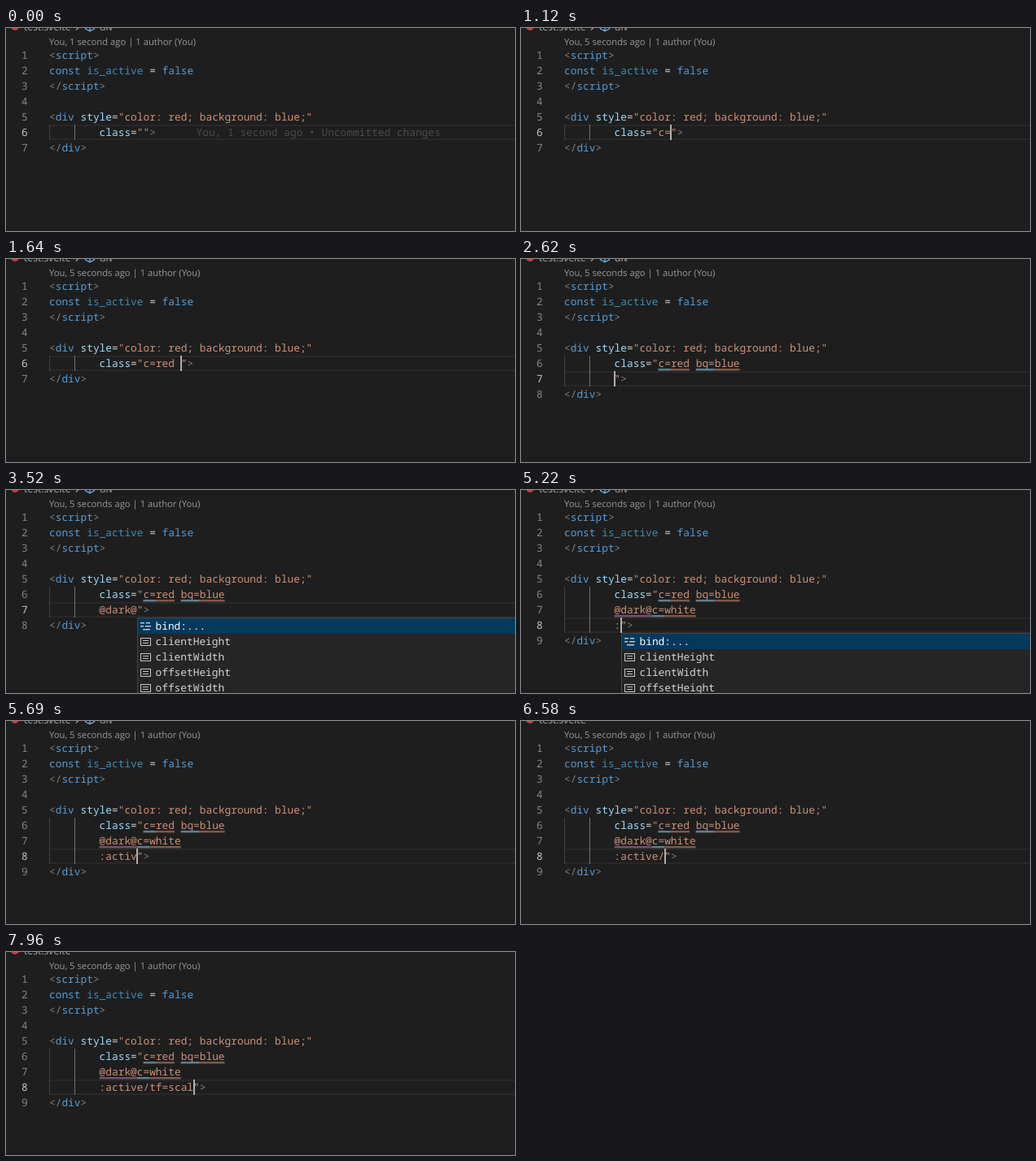
Write an HTML page with a canvas that moves like this. It is 625 by 250 pixels and loops after 8000 ms.

```html
<!DOCTYPE html>
<html lang="en">
<head>
<meta charset="utf-8">
<title>Editor typing</title>
<style>
html, body { margin: 0; width: 100%; height: 100%; overflow: hidden; background: #1e1e1e; }
canvas { display: block; width: 625px; height: 250px; }
</style>
</head>
<body>
<canvas id="stage" width="625" height="250"></canvas>
<script>
const ctx = document.getElementById('stage').getContext('2d');
const LOOP = 8000, LEFT = 53, CHAR = 7.7, ROW = 19, FIRST = 24;
const MONO = '12.83px "Noto Sans Mono", "DejaVu Sans Mono", monospace';
const LENS = '11.25px "Open Sans", "Noto Sans", sans-serif';
const CRUMB = '12.2px "Open Sans", "Noto Sans", sans-serif';
const C = {
  bg: '#1e1e1e', tag: '#808080', key: '#569cd6', attr: '#9cdcfe',
  str: '#ce9178', plain: '#d4d4d4', unused: '#3f8bb4'
};

// Typing bursts: start, interval, characters
const bursts = [
  [960, 160, 'c='], [1300, 90, 'red '], [1840, 78.5, 'bg=blue\n'],
  [2720, 85, '@dark@'], [3750, 95, 'c='], [3960, 75, 'white'], [4530, 0, '\n'],
  [5220, 0, ':'], [5420, 67.5, 'active'], [5920, 0, '/'],
  [6870, 130, 'tf'], [7430, 0, '='], [7660, 100, 'scal']
];
const keys = bursts.flatMap(([start, step, s]) => [...s].map((ch, i) => [start + i * step, ch]));

const popups = [[1220, 1300], [3225, 3750], [3890, 3960], [5220, 5420], [6150, 6380]];
const caretOff = [[0, 260], [3520, 3750], [4400, 4530], [5020, 5220]];

// Underlines: time, line of the value, column, length, colour
const BLUE = '#5b7f90', BROWN = '#7e5947', PLUM = '#74506f';
const marks = [
  [1670, 0, 15, 2, BLUE], [1670, 0, 17, 3, BROWN],
  [2386, 0, 21, 3, BLUE], [2386, 0, 24, 4, BROWN],
  [4330, 1, 8, 6, PLUM], [4330, 1, 14, 2, BLUE], [4330, 1, 16, 5, BROWN]
];
const options = ['bind:...', 'clientHeight', 'clientWidth', 'offsetHeight', 'offsetWidth'];

const within = (list, t) => list.some(([a, b]) => t >= a && t < b);
const colX = col => LEFT + col * CHAR;
const rowY = n => FIRST + (n - 1) * ROW;

function box(x, y, w, h, color) {
  ctx.fillStyle = color;
  ctx.fillRect(x, y, w, h);
}

function text(s, x, y, color, font = MONO) {
  ctx.font = font;
  ctx.fillStyle = color;
  ctx.fillText(s, x, y);
}

function path(points, color) {
  ctx.strokeStyle = color;
  ctx.lineWidth = 1.2;
  ctx.beginPath();
  points.forEach(([x, y]) => ctx.lineTo(x, y));
  ctx.stroke();
}

function code(n, parts, col = 0) {
  for (const [s, color] of parts) {
    text(s, colX(col), rowY(n) + 14, color);
    col += s.length;
  }
}

function breadcrumb(t) {
  ctx.fillStyle = '#cc3e44';
  ctx.beginPath();
  ctx.arc(11, -2, 5, 0, Math.PI * 2);
  ctx.fill();
  text('test.svelte', 22, 3, '#a9a9a9', CRUMB);
  if (t >= 6580) return;
  path([[86, 2.5], [90, -1.5]], '#a9a9a9');
  path([[97.5, -3], [97.5, 1], [103, 3.8], [108.5, 1], [108.5, -3]], '#75beff');
  path([[103, 3.8], [103, -1]], '#75beff');
  text('div', 115, 3, '#a9a9a9', CRUMB);
}

function optionIcon(x, y, isFirst) {
  if (isFirst) {
    [[0, 0, 5], [7, 0, 5], [0, 4, 4], [6, 4, 7], [3, 8, 9]]
      .forEach(([dx, dy, w]) => box(x + dx, y + dy, w, 1.5, '#c5c5c5'));
    return;
  }
  ctx.strokeStyle = '#c5c5c5';
  ctx.lineWidth = 1;
  ctx.strokeRect(x + .5, y + .5, 12, 9);
  box(x + 3, y + 3, 7, 1, '#c5c5c5');
  box(x + 3, y + 6, 7, 1, '#c5c5c5');
}

function popup(x, y) {
  box(x, y, 640, 120, '#454545');
  box(x + 1, y + 1, 640, 120, '#252526');
  box(x + 1, y + 1, 640, ROW, '#04395e');
  options.forEach((s, i) => {
    const top = y + 1 + i * ROW;
    optionIcon(x + 4, top + 5, i === 0);
    text(s, x + 22.5, top + 14, i ? C.plain : '#ffffff');
  });
}

function draw(t) {
  const value = keys.filter(([at]) => t >= at).map(k => k[1]).join('');
  const lines = value.split('\n');
  const last = lines.length - 1, active = 6 + last, y = rowY(active);
  const age = t < 260 ? '1 second' : '5 seconds';

  box(0, 0, 625, 250, C.bg);
  breadcrumb(t);
  text(`You, ${age} ago | 1 author (You)`, LEFT, 21, '#999999', LENS);

  box(LEFT, y, 572, 2, '#282828');
  box(LEFT, y + ROW - 2, 572, 2, '#282828');
  lines.forEach((_, i) => {
    if (i === 2 && t < 4660) return;
    box(53, rowY(6 + i), 1, ROW, '#404040');
    box(84, rowY(6 + i), 1, ROW, '#707070');
  });
  for (let n = 1; n <= active + 1; n++) {
    text(n, 19, rowY(n) + 14, n === active ? '#c6c6c6' : '#858585');
  }

  code(1, [['<', C.tag], ['script', C.key], ['>', C.tag]]);
  code(2, [['const ', C.key], ['is_active', C.unused], [' = ', C.plain], ['false', C.key]]);
  code(3, [['</', C.tag], ['script', C.key], ['>', C.tag]]);
  code(5, [['<', C.tag], ['div ', C.key], ['style', C.attr], ['=', C.plain],
    ['"color: red; background: blue;"', C.str]]);
  lines.forEach((s, i) => {
    const head = i ? [] : [['class', C.attr], ['=', C.plain], ['"', C.str]];
    const tail = i === last ? [['"', C.str], ['>', C.tag]] : [];
    code(6 + i, [...head, [s, C.str], ...tail], 8);
  });
  code(active + 1, [['</', C.tag], ['div', C.key], ['>', C.tag]]);

  for (const [at, line, col, len, color] of marks) {
    if (t >= at) box(colX(col), rowY(6 + line) + 16, len * CHAR, 2.5, color);
  }
  if (!value) {
    text(`You, ${age} ago • Uncommitted changes`, 233.5, y + 14, '#4a4a4a');
  }

  const caret = Math.floor(colX(8 + (last ? 0 : 7) + lines[last].length));
  if (!within(caretOff, t)) box(caret, y, 2, ROW, '#aeafad');
  if (within(popups, t)) popup(caret + 1, y + ROW);
}

ctx.textRendering = 'geometricPrecision';
const start = performance.now();
function tick() {
  draw((performance.now() - start) % LOOP);
  requestAnimationFrame(tick);
}
tick();
</script>
</body>
</html>
```
